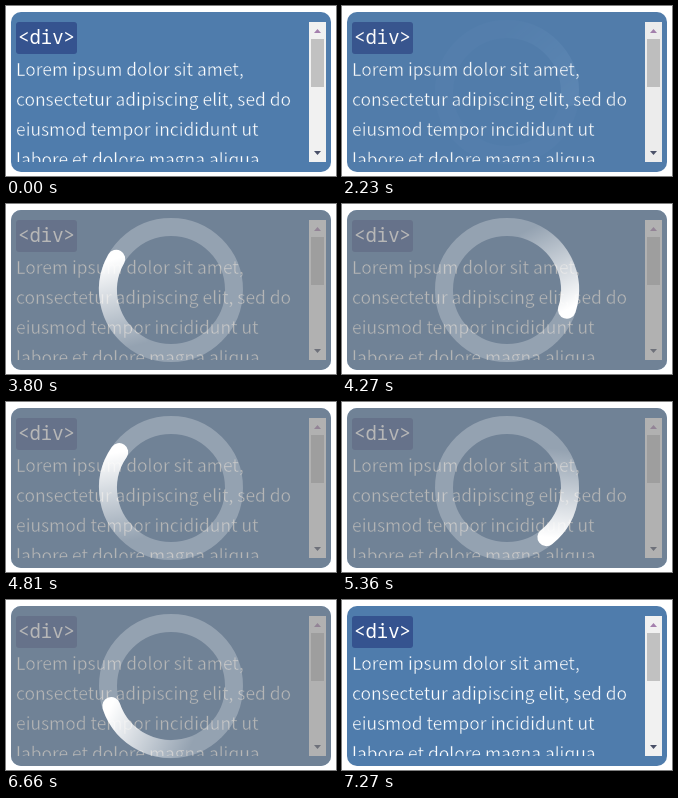
An HTML page for the animation above (7500 ms loop, 330 by 170 pixels).

```html
<!DOCTYPE html>
<html lang="en">
<head>
<meta charset="utf-8">
<title>Element overlay</title>
<style>
  html, body { margin: 0; width: 100%; height: 100%; overflow: hidden; background: #fff; }
  svg { display: block; }
  /* The panel-coloured stroke trims the letters to a light weight. */
  .copy { font: 300 17.4px "Noto Sans CJK JP", "Noto Sans CJK SC", sans-serif; fill: #fff; stroke: #4f7cac; stroke-width: .4px; }
  .tag { font: 500 19px "Noto Sans Mono", monospace; fill: #fff; }
  .ring { fill: none; stroke-width: 18; stroke-linecap: round; }
</style>
</head>
<body>
<svg width="330" height="170" viewBox="0 0 330 170">
  <defs>
    <clipPath id="content"><rect x="10" y="16" width="293" height="140"/></clipPath>
    <linearGradient id="tail" gradientUnits="userSpaceOnUse" x1="-63" y1="0" x2="0" y2="-63">
      <stop offset="0" stop-color="#fff" stop-opacity="0"/>
      <stop offset="1" stop-color="#fff"/>
    </linearGradient>
  </defs>

  <rect x="5" y="6" width="320" height="160" rx="10" fill="#4f7cac"/>
  <g clip-path="url(#content)">
    <rect x="10" y="16" width="61" height="32" rx="3" fill="#35538f"/>
    <text class="tag" x="12" y="38">&lt;div&gt;</text>
    <g class="copy">
      <text x="10" y="70">Lorem ipsum dolor sit amet,</text>
      <text x="10" y="100">consectetur adipiscing elit, sed do</text>
      <text x="10" y="130">eiusmod tempor incididunt ut</text>
      <text x="10" y="160">labore et dolore magna aliqua.</text>
    </g>
  </g>

  <!-- scrollbar -->
  <rect x="303" y="16" width="17" height="140" fill="#f1f1f1"/>
  <rect x="305" y="33" width="13" height="48" fill="#c1c1c1"/>
  <path d="M308 27h7l-3.5-4z" fill="#a580ae"/>
  <path d="M308 145h7l-3.5 4z" fill="#4a5068"/>

  <g id="overlay" opacity="0">
    <rect x="5" y="6" width="320" height="160" rx="10" fill="#888" fill-opacity=".6"/>
    <g transform="translate(165 86)">
      <circle class="ring" r="63" stroke="#fff" stroke-opacity=".25"/>
      <path id="spinner" class="ring" d="M-63 0A63 63 0 0 1 0-63" stroke="url(#tail)"/>
    </g>
  </g>
</svg>
<script>
  const LOOP = 7500, SHOW = 2230, HIDE = 7060, END = 7270, FADE = 200, STEP = 78;
  const runs = [SHOW, 3030, 3800, 4580, 5360, 6120, 6890];
  const overlay = document.getElementById('overlay');
  const spinner = document.getElementById('spinner');

  // Hold the picture between steps, ten steps to a run.
  function stepped(t) {
    const start = runs.filter(r => r <= t).pop();
    return start + Math.min(9, Math.floor((t - start + 6) / STEP)) * STEP;
  }

  function draw(t) {
    if (t < SHOW || t >= END) {
      overlay.setAttribute('opacity', 0);
      return;
    }
    const s = stepped(t);
    const fadeIn = 0.07 + (s - SHOW) / FADE;
    const fadeOut = 1 - (s - HIDE) / FADE;
    overlay.setAttribute('opacity', Math.max(0, Math.min(1, fadeIn, fadeOut)));
    spinner.setAttribute('transform', `rotate(${22.5 + (s - 3030) * 0.36})`);
  }

  const origin = performance.now();
  function tick() {
    draw((performance.now() - origin) % LOOP);
    requestAnimationFrame(tick);
  }
  tick();
</script>
</body>
</html>
```
